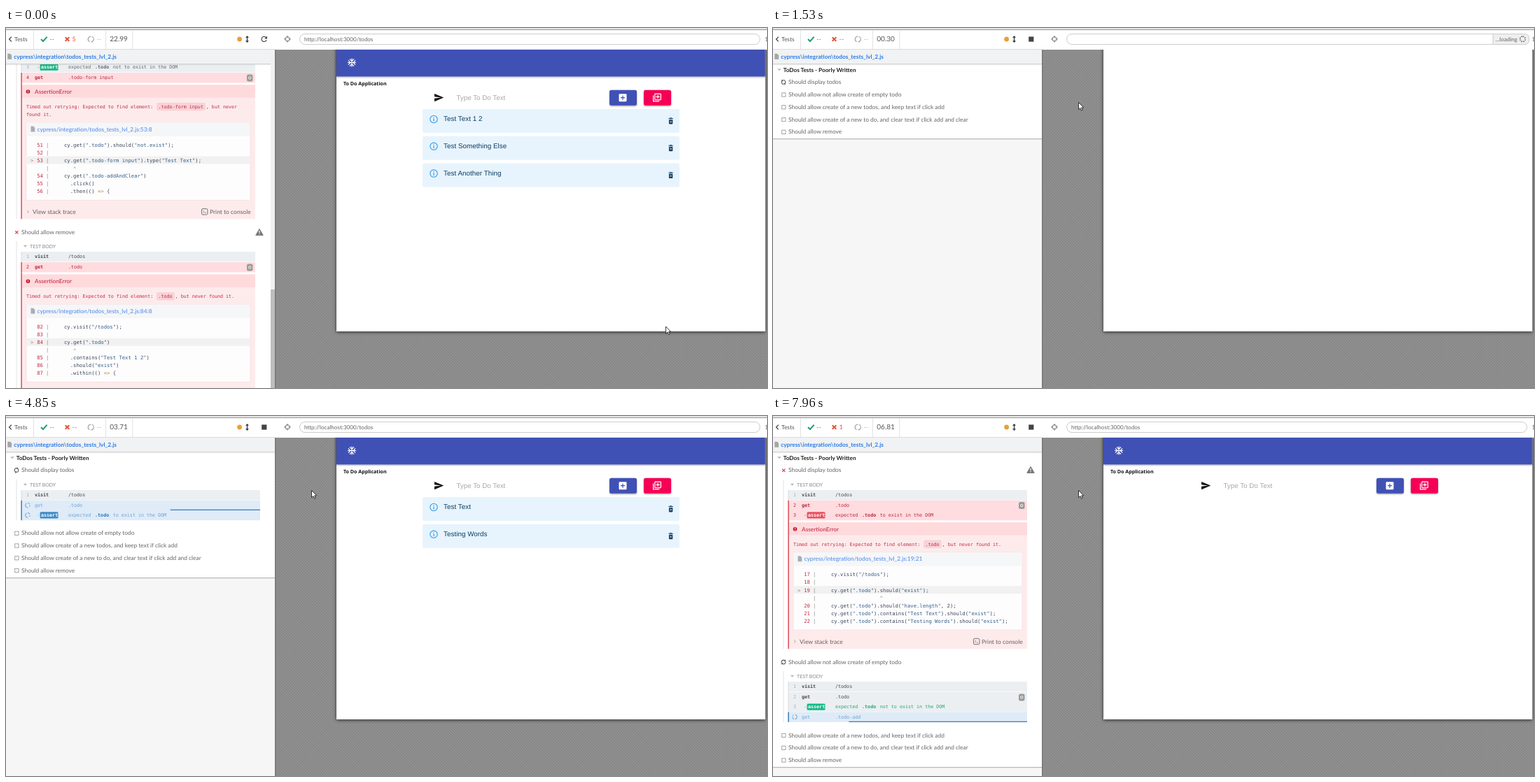
An HTML page that plays this animation: 1087 px wide and 515 px high, repeating every 8 s.

```html
<!DOCTYPE html>
<html lang="en">
<head>
<meta charset="utf-8">
<title>Test runner</title>
<style>
html, body { margin: 0; width: 100%; height: 100%; overflow: hidden; background: #fff; }
svg { display: block; width: 1087px; height: 515px; }
text { font-family: Lato, "Open Sans", sans-serif; white-space: pre; text-rendering: geometricPrecision; }
.mono { font-family: "DejaVu Sans Mono", "Noto Sans Mono", monospace; }
.sans { font-family: "Liberation Sans", Arial, sans-serif; }
.open { font-family: "Open Sans", "Noto Sans", sans-serif; }
</style>
</head>
<body>
<svg id="stage" viewBox="0 0 1087 515" xmlns="http://www.w3.org/2000/svg"></svg>
<script>
const LOOP = 8000;
const stage = document.getElementById('stage');

// Markup helpers
const rect = (x, y, w, h, fill, more = '') =>
  `<rect x="${x}" y="${y}" width="${w}" height="${h}" fill="${fill}" ${more}/>`;
const text = (x, y, s, size, fill, more = '') =>
  `<text x="${x}" y="${y}" font-size="${size}" fill="${fill}" ${more}>${s}</text>`;
const mono = (x, y, s, fill, more = '', size = 6.7) => text(x, y, s, size, fill, 'class="mono" ' + more);
const sans = (x, y, s, size, fill, more = '') => text(x, y, s, size, fill, 'class="sans" ' + more);
const line = (d, stroke, width = 1, more = '') =>
  `<path d="${d}" fill="none" stroke="${stroke}" stroke-width="${width}" ${more}/>`;
const shape = (d, fill, more = '') => `<path d="${d}" fill="${fill}" ${more}/>`;
const circle = (x, y, r, fill, more = '') => `<circle cx="${x}" cy="${y}" r="${r}" fill="${fill}" ${more}/>`;
const group = (id, s) => `<g id="${id}">${s}</g>`;
const at = (x, y, s) => `<g transform="translate(${x} ${y})">${s}</g>`;
const spin = (x, y, s) => at(x, y, `<g class="spin">${s}</g>`);
const BOLD = 'font-weight="700"';

// Small icons
const cross = (x, y, r, fill, w) => line(`M${x - r} ${y - r}l${2 * r} ${2 * r}m0 ${-2 * r}l${-2 * r} ${2 * r}`, fill, w);
const syncIcon = y => spin(15, y,
  line('M-2.9 .6A3 3 0 0 1 1.8 -2.3M2.9 -.6A3 3 0 0 1 -1.8 2.3', '#555', 1.1) +
  shape('M3.2 -3.6V-.8H.5ZM-3.2 3.6V.8H-.5Z', '#555'));
const notch = y => spin(31, y, line('M1 -3.2A3.3 3.3 0 1 1 -1.6 -2.9', '#6ea3d4', 1, 'stroke-dasharray="9 1.3 4 1.3"'));
const warning = (x, y) => shape(`M${x} ${y - 4.6}l5.2 9h-10.4z`, '#777', 'stroke="#777" stroke-linejoin="round"') +
  rect(x - .6, y - 2.2, 1.2, 3.4, '#fff') + rect(x - .6, y + 2, 1.2, 1.2, '#fff');
const fileIcon = (x, y, fill) => shape(`M${x} ${y - 4}h3.6l2.2 2.2v5.8h-5.8z`, fill);
const caretDown = (x, y) => shape(`M${x - 2.6} ${y - 1.3}h5.2l-2.6 3z`, '#b5b5b5');

// Reporter parts; y is the vertical middle of a row
const testRow = (y, title, state) =>
  (state === 'run' ? syncIcon(y) : state === 'fail' ? cross(15.3, y + .2, 2.1, '#e0364c', 1.2)
    : rect(12.7, y - 2.4, 5.3, 5.3, 'none', 'stroke="#999" stroke-width=".9"')) +
  text(22, y + 2.9, title, 8.4, '#666');
const bodyHead = (y, bottom) => rect(14.5, y - 7, 1, bottom - y + 7, '#e4e4e4') + caretDown(27.5, y) +
  text(34, y + 2.5, 'TEST BODY', 7, '#888');

const LOOKS = {
  done: { bg: '#eceff1', bar: '#dfe3e6', ink: '#444b55', num: '#aab' },
  pass: { bg: '#eceff1', bar: '#dfe3e6', ink: '#1fa97c', num: '#aab', tag: '#16b987' },
  fail: { bg: '#ffdcdf', bar: '#e05561', ink: '#b8283f', num: '#b8283f', tag: '#e94f5f' },
  wait: { bg: '#dfebf7', bar: '#3f85c0', ink: '#6ea3d4', num: '', tag: '#3d8bc8' }
};
function command(y, n, name, msg, look, r, count) {
  const c = LOOKS[look], b = y + 2.3;
  let s = rect(22, y - 7, r - 22, 14.4, c.bg) + rect(21.3, y - 7, 1.6, 14.4, c.bar);
  s += look === 'wait' ? notch(y) : mono(29, b, n, c.num);
  if (name === 'assert') {
    s += mono(44, b, '-', c.ink) + rect(48.5, y - 4.6, 26, 9.3, c.tag, 'rx="1.5"') + mono(50, b, 'assert', '#fff', BOLD);
    s += mono(89, b, `expected <tspan dx="1.8" ${BOLD}${look === 'wait' ? ' fill="#2d78b8"' : ''}>.todo</tspan><tspan dx="1.5"> ${msg}</tspan>`, c.ink);
  } else {
    s += mono(41, b, name, c.ink, look === 'wait' ? '' : 'font-weight="600"') + mono(89, b, msg, c.ink);
  }
  if (count) s += rect(r - 12, y - 4.6, 8.5, 10, '#9a9a9a', 'rx="2.5"') +
    circle(r - 7.8, y + .4, 1.7, 'none', 'stroke="#fff" stroke-width=".9"');
  return s;
}

const paint = s => s.replace(/"[^"]*"/g, q => `<tspan fill="#35608c">${q}</tspan>`)
  .replace('=>', '<tspan fill="#c08038">=&gt;</tspan>');

function errorBlock(y, r, target, place, caret, first, code, wrap) {
  const pink = '#c22c46', d = wrap ? 11 : 0, w = 5.5 + target.length * 4.02, k = y + 43 + d;
  let s = rect(22, y, r - 22, 181 + d, '#fdebec') + rect(22, y, r - 22, 18.5, '#ffdadd') + rect(21.3, y - 3, 1.6, 184 + d, '#e05561');
  s += circle(31.5, y + 9.7, 2.8, '#c5162e') + rect(31.1, y + 8, .9, 2.2, '#fff') + rect(31.1, y + 10.8, .9, .9, '#fff');
  s += text(41, y + 12.6, 'AssertionError', 8.3, '#c22c46', 'font-weight="500"');
  s += mono(29, y + 33.5, 'Timed out retrying: Expected to find element:', pink);
  s += rect(215, y + 25.5, w, 11.5, '#f9d2d6', 'rx="2"') + mono(217.5, y + 33.5, target, pink);
  s += mono(215 + w + 1, y + 33.5, wrap ? ', but never' : ', but never found it.', pink);
  if (wrap) s += mono(29, y + 44.5, 'found it.', pink);
  s += rect(29, k, r - 36, 111, '#fefdfd', 'stroke="#f7dde0" stroke-width=".8"') + rect(29.4, k, r - 36.8, 19.5, '#f5f6f8');
  s += fileIcon(35.5, k + 9.3, '#a9adb3') + text(44.5, k + 12.3, 'cypress/integration/' + place, 8.36, '#4a86e8');
  s += rect(29.4, k + 48.2, r - 36.8, 11, '#f1f1f1');
  let n = first;
  code.forEach((src, i) => {
    const b = k + 34.4 + i * 11.05, mark = src === '^';
    if (!mark) s += mono(44.2, b, n++, pink, '', 7.24);
    if (i === 2) s += mono(35, b, '&gt;', '#d9705f', '', 7.24);
    s += mono(57, b, '|', '#888', '', 7.24);
    s += mark ? mono(83 + caret * 4.345, b + .8, '^', '#888', '', 7.24) : mono(83, b, paint(src), '#3d4960', '', 7.24);
  });
  const f = y + 170.5 + d;
  s += line(`M30.3 ${f - 2}l2 2l-2 2`, '#999', .9) + text(38, f + 3, 'View stack trace', 8.6, '#6b5d60');
  s += rect(r - 76.5, f - 4.2, 8.4, 8.4, 'none', 'rx="1.5" stroke="#666" stroke-width=".9"') +
    line(`M${r - 74.6} ${f - 1.7}l1.7 1.7l-1.7 1.7m2.4 0h2`, '#666', .8);
  return s + text(r - 65, f + 3, 'Print to console', 8.5, '#6b5d60');
}

// Reporter states
const TITLES = ['Should display todos', 'Should allow not allow create of empty todo',
  'Should allow create of a new todos, and keep text if click add',
  'Should allow create of a new to do, and clear text if click add and clear', 'Should allow remove'];

function oldRun() {
  const r = 356;
  return rect(0, 51, 384, 464, '#fff') + rect(14.5, 51, 1, 222, '#e4e4e4') +
    command(56, 3, 'assert', 'not to exist in the DOM', 'pass', r).replace(/#1fa97c/g, '#667') +
    command(71, 4, 'get', '.todo-form input', 'fail', r, true) +
    errorBlock(81.3, r, '.todo-form input', 'todos_tests_lvl_2.js:53:8', 3, 51,
      ['cy.get(".todo").should("not.exist");', '', 'cy.get(".todo-form input").type("Test Text");', '^',
        'cy.get(".todo-addAndClear")', '  .click()', '  .then(() => {'], true) +
    testRow(292, TITLES[4], 'fail') + warning(362, 292) + bodyHead(312, 515) +
    command(327, 1, 'visit', '/todos', 'done', r) + command(342, 2, 'get', '.todo', 'fail', r, true) +
    errorBlock(352.5, r, '.todo', 'todos_tests_lvl_2.js:84:8', 3, 82,
      ['cy.visit("/todos");', '', 'cy.get(".todo")', '^', '  .contains("Test Text 1 2")', '  .should("exist")', '  .within(() => {']);
}

function loadingTests() {
  const dots = ['#56b394', '#4688c9', '#bd5f61', '#e3ae66', '#a9a9a9'];
  return dots.map((c, i) => circle(153 + i * 18.4, 98, 6.2, c)).join('') +
    text(190, 136.5, 'Your tests are loading...', 13.4, '#555', 'text-anchor="middle"');
}

function testList(step) {
  const r = 363, bottom = [158, 231, 415, 502][step];
  let s = rect(0, 51, 384, bottom - 51, '#fff') + rect(0, bottom, 384, 1, '#b9b9b9') + rect(0, bottom + 1, 384, 1, '#e6e6e6');
  s += caretDown(9, 59.5) + text(14.8, 62.6, 'ToDos Tests - Poorly Written', 8.2, '#222', BOLD);
  s += testRow(77.5, TITLES[0], step > 1 ? 'fail' : 'run');
  let y = 95.3;
  if (step) {
    const look = step > 1 ? 'fail' : 'wait';
    s += bodyHead(98, step > 1 ? 333 : 149) + command(113, 1, 'visit', '/todos', 'done', r) +
      command(127.7, 2, 'get', '.todo', look, r, step > 1) + command(141.8, 3, 'assert', 'to exist in the DOM', look, r);
    y = 167.5;
  }
  if (step > 1) {
    s += warning(368, 77) + errorBlock(152, r, '.todo', 'todos_tests_lvl_2.js:19:21', 16, 17,
      ['cy.visit("/todos");', '', 'cy.get(".todo").should("exist");', '^', 'cy.get(".todo").should("have.length", 2);',
        'cy.get(".todo").contains("Test Text").should("exist");', 'cy.get(".todo").contains("Testing Words").should("exist");']);
    y = 352;
  }
  s += testRow(y, TITLES[1], step > 1 ? 'run' : '');
  if (step === 3) {
    s += bodyHead(372, 438) + command(387, 1, 'visit', '/todos', 'done', r) + command(402, 2, 'get', '.todo', 'done', r, true) +
      command(416, 3, 'assert', 'not to exist in the DOM', 'pass', r) + command(430.5, 4, 'get', '.todo-add', 'wait', r);
    y = 439;
  }
  for (let i = 2; i < 5; i++) s += testRow(y += 17.75, TITLES[i], '');
  return s;
}

// Page under test
const todo = (label, i) => {
  const y = 116 + i * 38.8;
  return group('todo' + i, rect(595, y, 367, 34, '#e7f4fd', 'rx="2.5"') +
    circle(611, y + 14.5, 5.2, 'none', 'stroke="#2f9bea" stroke-width="1.1"') +
    rect(610.4, y + 13.5, 1.2, 4, '#2f9bea') + rect(610.4, y + 11.4, 1.2, 1.2, '#2f9bea') +
    `<text class="sans label" x="625" y="${y + 17.3}" font-size="9.8" letter-spacing=".05" fill="#0d3c61">${label}</text>` +
    shape(`M946.4 ${y + 13}h1.6l.6 -.7h2l.6 .7h1.6v1h-6.4z`, '#173f63') +
    rect(946.9, y + 14.9, 5.4, 6.5, '#173f63', 'rx=".8"') + cross(949.6, y + 18, 1.2, '#e7f4fd', .8));
};

function app() {
  const arm = line('M0 0V-6.1M-3.1 -5.1L0 -2L3.1 -5.1', '#fff', 1.2);
  const flake = [0, 90, 180, 270].map(a => `<g transform="rotate(${a})">${arm}</g>`).join('');
  return rect(472, 30.5, 612.5, 38.8, '#3f51b5', 'filter="url(#soft)"') + at(494, 49.5, flake) +
    text(482, 82, 'To Do Application', 7.08, '#111', 'class="open" ' + BOLD) +
    shape('M2 21L23 12 2 3V10l15 2-15 2z', '#111', 'transform="translate(610.7 92) scale(.63)"') +
    sans(643.4, 103.2, 'Type To Do Text', 9.8, '#a8a8a8') +
    rect(862, 88.7, 39, 22, '#3f51b5', 'rx="2.5" filter="url(#soft)"') + rect(911, 88.7, 39, 22, '#f50057', 'rx="2.5" filter="url(#soft)"') +
    rect(875.5, 94.2, 11, 11, '#fff', 'rx="1.2"') + line('M878 99.7h6m-3 -3v6', '#3f51b5', 1.2) +
    rect(926.8, 94.1, 8.6, 8.6, 'none', 'rx=".8" stroke="#fff" stroke-width="1.2"') +
    line('M924.6 96.4v8.5h8.6M928.4 98.4h5.4m-2.7 -2.7v5.4', '#fff', 1.2) +
    ['Test Text 1 2', 'Test Something Else', 'Test Another Thing'].map(todo).join('');
}

function blankPage() {
  const mid = 'text-anchor="middle"', ink = '#333';
  let s = rect(484.5, 42, 587.5, 226, '#eee', 'rx="4"');
  s += shape('M765.5 94L778 83.4L790.5 94V106.3Q790.5 107.5 789.3 107.5H781.3V98.5H774.7V107.5H766.7Q765.5 107.5 765.5 106.3Z', ink) +
    line('M761 93.8L778 79.5L795 93.8', ink, 3, 'stroke-linejoin="round"') + rect(786.2, 79.4, 4.3, 8, ink);
  s += sans(778.3, 133, 'This is the default blank page.', 12.87, ink, mid) + sans(778.3, 160, 'To test your web application:', 12.87, ink, mid);
  s += rect(711, 173, 135, 70.5, '#dcdcdc', 'rx="4.5"');
  [196.6, 211.5, 226.2].forEach((y, i) => s += sans(726, y, i + 1 + '.', 8.6, ink));
  s += sans(735.6, 196.6, "Start your app's server", 8.62, ink) + sans(735.6, 226.2, 'Begin writing tests', 8.62, ink);
  s += rect(735.3, 202, 51.5, 13, '#666', 'rx="2"') + mono(737.6, 211.2, 'cy.visit()', '#fff', '', 7.8);
  return s + sans(789, 211.5, 'your app', 8.62, ink);
}

// Fixed frame of the runner
const defs = `<defs>
  <pattern id="hatch" width="4" height="4" patternUnits="userSpaceOnUse">${rect(0, 0, 4, 4, '#929292')}
    ${line('M-1 -1L5 5M-1 3L1 5M3 -1L5 1', '#838383', 1.2)}</pattern>
  <filter id="soft" x="-10%" y="-20%" width="120%" height="160%"><feDropShadow dx="0" dy="1" stdDeviation="1" flood-opacity=".4"/></filter>
  <filter id="deep" x="-5%" y="-5%" width="110%" height="110%"><feDropShadow dx="0" dy="1" stdDeviation="2.6" flood-opacity=".7"/></filter>
  <clipPath id="list"><rect y="51" width="385" height="464"/></clipPath>
  <clipPath id="view"><rect x="385" y="30.5" width="702" height="485"/></clipPath>
</defs>`;

const toolbar = () => rect(0, 0, 1087, 30.5, '#fff') + rect(0, 0, 1087, 1.2, '#f0f0f0') + rect(0, 1.5, 1087, 1.6, '#aaa') +
  rect(0, 30, 384.5, 1, '#dcdcdc') + line('M39.5 3V30M142.5 3V30', '#e2e2e2') + rect(162, 3, 1, 27, '#e2e2e2', 'id="edge"') +
  line('M7.8 12.6L4.6 16L7.8 19.4', '#444', 1.3) + text(12, 19, 'Tests', 8.4, '#555') +
  line('M50 16L53 19L58.6 12.7', '#1d9e76', 2) + text(62.3, 18.8, '--', 8.6, '#1d9e76') +
  cross(87.5, 16, 2.8, '#e0543f', 2) + `<text id="fails" x="94.6" y="19" font-size="9" fill="#e0543f"></text>` +
  circle(121.3, 16, 4, 'none', 'stroke="#999" stroke-width="1.1" stroke-dasharray="10.5 2" transform="rotate(-68 121.3 16)"') +
  text(129.8, 18.8, '--', 8.6, '#aaa') + `<text id="clock" x="148.3" y="19.4" font-size="10" fill="#555"></text>` +
  circle(333.6, 16, 3.4, '#ea9f3c') + line('M344.5 12.5V19.5', '#333', 1.3) + shape('M342 13.8L344.5 11L347 13.8ZM342 18.2L344.5 21L347 18.2Z', '#333') +
  group('reload', line('M371.6 13.8A3.6 3.6 0 1 0 372 17.2', '#444', 1.2) + shape('M373 11.6V15.4H369.2Z', '#444')) +
  rect(365.2, 12.4, 7.2, 7.2, '#444', 'id="stop"') +
  circle(402, 15.8, 3.2, 'none', 'stroke="#777" stroke-width="1"') + line('M402 11v3.2m0 3.2v3.2M397.2 15.8h3.2m3.2 0h3.2', '#777', 1) +
  rect(419.5, 8.5, 657.5, 15, '#fff', 'rx="7.5" stroke="#ccc"') +
  group('url', text(426, 18.8, 'http://localhost:3000/todos', 8.1, '#666')) +
  group('busy', shape('M1028.5 8.5H1074.5Q1080 8.5 1080 16T1074.5 23.5H1028.5Z', '#efefef', 'stroke="#ccc"') +
    text(1032, 18.7, '...loading', 8.05, '#666') +
    spin(1070.8, 15.8, circle(0, 0, 3.8, 'none', 'stroke="#555" stroke-width="1.5" stroke-dasharray="1.5 1.48"'))) +
  text(1083.8, 18.8, '1', 8.6, '#777');

stage.innerHTML = defs + rect(0, 0, 1087, 515, '#fff') + rect(0, 51, 384.5, 464, '#f6f6f6') +
  `<g clip-path="url(#list)">` + group('old', oldRun()) + group('load', loadingTests()) +
  [0, 1, 2, 3].map(i => group('list' + i, testList(i))).join('') +
  rect(22, 134, 341, 1.2, '#2f77b5', 'id="bar"') + '</g>' +
  rect(0, 31, 384.5, 20, '#f1f2f3') + rect(0, 51, 384.5, 1, '#cfcfcf') + rect(0, 52, 384.5, 1.5, '#000', 'opacity=".05"') +
  group('scroll', rect(378, 31, 6.5, 484, '#f1f1f1') + rect(378, 374, 6.5, 141, '#bdbdbd')) +
  fileIcon(2.3, 40.8, '#a5a5a5') + text(11.2, 43.7, 'cypress\\integration\\todos_tests_lvl_2.js', 8.3, '#2b7be9', BOLD) +
  rect(384.3, 31, 702.7, 484, 'url(#hatch)') + rect(384, 31, 1.4, 484, '#777') +
  `<g clip-path="url(#view)">` + rect(472, 20, 612.5, 414, '#fff', 'filter="url(#deep)"') + group('app', app()) + group('blank', blankPage()) + '</g>' +
  toolbar() +
  group('cursor', shape('M0 0V10.2L2.4 8L4 11.6L5.7 10.9L4.1 7.4H7.2Z', '#fff', 'stroke="#222" stroke-width=".9" stroke-linejoin="round"'));

// Timeline
const RESET = 670, START = 1300, VISIT = 1400, LOADED = 2180, RUN = 2356, ITEMS = 2400, FAIL = 6430, VISIT2 = 6740, LOADED2 = 7560, RUN2 = 7730;
const $ = id => document.getElementById(id);
const show = (id, on) => $(id).setAttribute('display', on ? 'inline' : 'none');
const within = (t, a, b) => t >= a && t < b;
const spinners = [...document.querySelectorAll('.spin')];
const labels = [...document.querySelectorAll('.label')];

const PATH = [[70, 942.5, 427], [560, 369, 14], [900, 369, 14], [1140, 436.5, 106.5]];
function cursorAt(t) {
  const i = PATH.findIndex(p => t < p[0]);
  if (i < 0) return PATH[PATH.length - 1].slice(1);
  if (i === 0) return PATH[0].slice(1);
  const [t0, x0, y0] = PATH[i - 1], [t1, x1, y1] = PATH[i];
  const u = (t - t0) / (t1 - t0), e = u * u * (3 - 2 * u);
  return [x0 + (x1 - x0) * e, y0 + (y1 - y0) * e];
}

function clockText(t) {
  if (t < RESET) return '22.99';
  if (t < START) return '--';
  const shown = within(t, 6755, 6900) ? 6755 : t; // the clock stalls while the page is torn down
  const tenths = Math.floor((shown - 1145) / 100);
  return String(Math.floor(tenths / 10)).padStart(2, '0') + '.' + tenths % 10 + (tenths < 10 ? 0 : 1);
}

function update(t) {
  show('old', t < RESET);
  show('scroll', t < RESET);
  show('load', within(t, RESET, START));
  [START, RUN, FAIL, RUN2, LOOP].forEach((a, i, all) => i < 4 && show('list' + i, within(t, a, all[i + 1])));

  show('app', t < RESET || within(t, LOADED, VISIT2) || t >= LOADED2);
  show('blank', within(t, RESET, VISIT));
  const second = within(t, ITEMS, VISIT2);
  show('todo0', t < RESET || second);
  show('todo1', t < RESET || second);
  show('todo2', t < RESET);
  labels[0].textContent = second ? 'Test Text' : 'Test Text 1 2';
  labels[1].textContent = second ? 'Testing Words' : 'Test Something Else';

  show('url', !within(t, START, LOADED));
  show('busy', within(t, VISIT, LOADED) || within(t, VISIT2, LOADED2));
  show('reload', t < START);
  show('stop', t >= START);
  $('fails').textContent = t < RESET ? '5' : t < FAIL ? '--' : '1';
  const clock = clockText(t);
  $('clock').textContent = clock;
  $('edge').setAttribute('x', clock === '--' ? 162 : 180.3);

  // Time left of a waiting command
  const late = t >= RUN2;
  const left = 22 + 341 * Math.min(1, Math.max(0, (t - (late ? 6948 : RUN)) / 4000));
  show('bar', within(t, RUN, FAIL) || late);
  $('bar').setAttribute('x', left);
  $('bar').setAttribute('width', 363 - left);
  $('bar').setAttribute('y', late ? 436.7 : 133.7);

  for (const s of spinners) s.setAttribute('transform', `rotate(${t * .18 % 360})`);
  $('cursor').setAttribute('transform', `translate(${cursorAt(t)})`);
}

const begin = performance.now();
function tick() {
  update((performance.now() - begin) % LOOP);
  requestAnimationFrame(tick);
}
tick();
</script>
</body>
</html>
```
